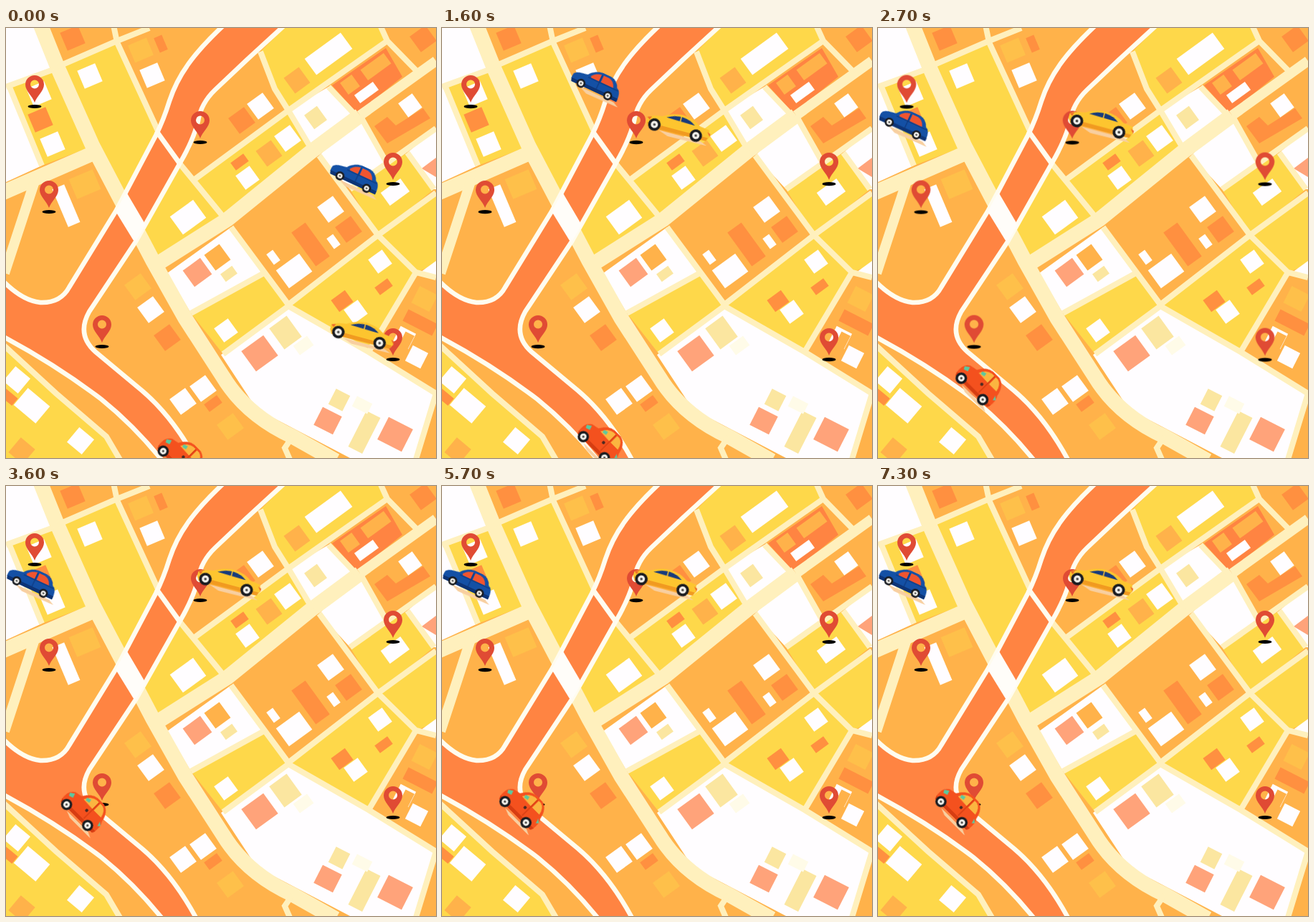
Recreate the animation shown at these times as an HTML page. Size 600 by 600 pixels, loop 7.4 s.

```html
<!DOCTYPE html>
<html lang="en">
<head>
<meta charset="utf-8">
<title>City map with cars</title>
<style>
html, body { margin: 0; width: 100%; height: 100%; overflow: hidden; background: #fff0bd; }
svg { display: block; width: 100vw; height: 100vh; }
.streets { fill: none; stroke: #fff0bd; }
.breathe {
  transform-box: fill-box;
  transform-origin: center;
  animation: breathe 1850ms ease-in-out infinite;
}
@keyframes breathe { 50% { transform: scale(1.02); } }
</style>
</head>
<body>
<svg viewBox="0 0 600 600">
  <defs>
    <g id="pin">
      <path fill="#e04b34" fill-rule="evenodd" d="M0 38C-3 29-13 22-13 13A13 13 0 0 1 13 13C13 22 3 29 0 38ZM-6 12.5A6 6 0 0 0 6 12.5A6 6 0 0 0-6 12.5Z"/>
      <ellipse cy="43.5" rx="9.5" ry="2.6"/>
    </g>
    <g id="wheel">
      <circle r="8.7" fill="#191b20"/>
      <circle r="5" fill="#f4f2ed"/>
      <circle r="1.8" fill="#444"/>
    </g>
  </defs>

  <!-- Districts meet at the street centre lines; the streets are drawn over them. -->
  <rect width="600" height="600" fill="#ffb24a"/>
  <path fill="#fed84a" d="M4 80 66 58 121 165 50 192ZM72 52 155 18 214 148 162 240ZM243 190 302 262 205 327 188 285ZM262 212 394 115 428 172 309 267ZM355 33 388 0H522L532 18 394 115 375 85ZM480 225 560 174 597 225 519 289ZM519 289 600 230V330L572 341ZM258 398 358 343 394 386 303 455ZM394 386 519 289 572 341 506 452ZM0 446 70 510 140 570 160 600H0Z"/>
  <path fill="#fffdff" d="M0 0H46L72 58 4 80 50 192 0 215ZM394 115 450 82 494 122 428 172ZM437 178 494 122 530 186 480 225ZM560 174 600 140V225H597ZM225 342 314 278 358 343 258 398ZM300 456 394 388 600 512 572 600H480L350 532ZM578 341 600 325V348Z"/>
  <path fill="#ff8442" d="M455 80 530 28 553 68 490 119Z"/>
  <path fill="#ff9040" d="M514 137 532 124 544 136 582 112 592 126 532 161Z"/>
  <path fill="#ffa37a" d="M580 196 600 181V208Z"/>
  <g class="streets">
    <path stroke-width="21" d="M48-5 72 55 121 165 205 325 250 405 303 487Q335 540 400 570L460 604M-5 230 128 172M205 333 309 267 425 173 494 122"/>
    <path stroke-width="14" d="M494 122 600 46M42 208-2 342"/>
    <path stroke-width="8" d="M72 54 155 18 200 0M150-4 155 20 214 148M0 82 66 58M4 80 50 192M262 212 394 115 532 18 522-4M355 33 375 85 394 115 428 172M532 18 575 62M450 82 490 124M243 190 302 262M314 278 394 386 519 289 600 230M258 398 358 343M437 178 519 289 572 341 600 348M494 122 530 186M480 225 600 140M560 174 597 225M303 455 394 388 506 452 600 510 572 602M572 341 506 452M400 570 389 586 396 602M-4 442 70 510 140 570 160 604"/>
  </g>
  <g id="houses"></g>

  <path fill="#ff8442" stroke="#fffcef" stroke-width="6.5" d="M305-5C262 35 240 65 228 102Q220 128 209 150L153 256 88 362Q76 384 48 383 22 380-5 352V430Q70 470 133 518 180 556 220 606H267Q232 540 185 502L125 452Q98 428 116 396L181 298 243 188Q262 155 268 130 272 105 292 86 340 40 390-5Z"/>
  <path stroke="#fffcef" stroke-width="7" d="M210 144 243 190"/>
  <path fill="#fffdf9" d="M168 229 195 275 180 300 153 256Z"/>

  <g id="pins"></g>

  <g class="car" data-route="M484.5 215Q330 107 213.5 86 131 71 33.5 141" data-duration="2800" data-tilt="25"><g class="breathe">
    <path fill="#f8cfa0" d="M-20 5H32L40 9-8 10Z"/>
    <path fill="#1450a5" d="M-36-3Q-37-11-28-13L-17-15Q-10-25 2-26H14Q24-25 28-15 35-13 35 2L-34 3Z"/>
    <path fill="#0d3477" d="M-36-2H35V3H-34Z"/>
    <path fill="#f0552f" d="M-12-15Q-7-22 1-23V-13H-11ZM4-23H12Q20-22 23-13H4Z"/>
    <path fill="none" stroke="#0d3477" d="M2-23V-2M-15-12H31"/>
    <use href="#wheel" transform="translate(-20.5) scale(.72)"/>
    <use href="#wheel" transform="translate(20.5) scale(.72)"/>
  </g></g>

  <g class="car" data-route="M492.5 432Q505 232 325.5 142.5L307 137.5" data-duration="1870" data-tilt="15"><g class="breathe">
    <path fill="#f8cfa0" d="M-22 6H38L48 10-8 11Z"/>
    <path fill="#fdc52f" d="M-42-8Q-34-13-22-14-10-22 5-23 22-22 32-14L46-12 49-3 45 4-38 5-42-1Z"/>
    <path fill="#f19a20" d="M-40-1H47L45 4-38 5Z"/>
    <path fill="#173b7c" d="M-16-14Q-6-20 5-20 18-19 25-13Z"/>
    <path fill="none" stroke="#fdc52f" stroke-width="1.5" d="M4-21V-12"/>
    <path fill="#ee6a2a" d="M-42-8-36-10-38-5ZM44-9 49-7V-3Z"/>
    <use href="#wheel" x="-29.8"/>
    <use href="#wheel" x="29.8"/>
  </g></g>

  <g class="car" data-route="M234 605C262 645 268 640 211 584L129 501Q99 470 98 460.5L102.5 455" data-duration="3950" data-tilt="45"><g class="breathe">
    <path fill="#f8cfa0" d="M-14 6H28L36 10-4 10Z"/>
    <path fill="#f4511e" d="M-31-2Q-33-16-24-21L-14-23Q-7-36 4-37H16Q28-34 31-18 36-10 33 2L-29 3Z"/>
    <path fill="#d63d12" d="M-31-2H34L32 3H-29Z"/>
    <path fill="#fbb540" d="M-9-22Q-4-33 5-34H9V-21ZM12-34H16Q24-32 26-21H12Z"/>
    <path fill="none" stroke="#c9370f" d="M10-34V-3"/>
    <path fill="#5cc8a0" d="M-29-15-23-19-21-13-27-11ZM-7-27-1-29 0-24-6-23ZM29-16 34-12 31-9Z"/>
    <circle cx="5" cy="-14" r="2.2" fill="#4b2a22"/>
    <use href="#wheel" transform="translate(-20.7) scale(.9)"/>
    <use href="#wheel" transform="translate(20.7) scale(.9)"/>
  </g></g>
</svg>
<script>
const svgNS = "http://www.w3.org/2000/svg";
const loopMs = 7400;

function add(parentId, tag, attrs) {
  const node = document.createElementNS(svgNS, tag);
  for (const [key, value] of Object.entries(attrs)) node.setAttribute(key, value);
  document.getElementById(parentId).append(node);
  return node;
}

const points = text => text.split(" ").map(pair => pair.split(",").map(Number));

// Houses line up with the streets of their quarter.
function streetAngle(x, y) {
  if (x < 230 && y < 260) return -23;
  if (x < 110) return 40;
  return x + y > 930 ? 27 : -36;
}

function houses(fill, width, height, places) {
  for (const [x, y] of points(places)) {
    add("houses", "rect", {
      x: -width / 2, y: -height / 2, width, height, fill,
      transform: `translate(${x} ${y}) rotate(${streetAngle(x, y)})`
    });
  }
}

const white = "#fffdff", rust = "#ff9040", orange = "#ffb24a";
const amber = "#fec04a", salmon = "#ffa37a", cream = "#fbe6a0";

houses(white, 27, 27, "46,92 117,67 204,66 65,162 355,109 393,154 453,253 202,393 247,521 275,503 15,491 104,576");
houses(white, 24, 24, "337,209 307,422 522,326 488,396 573,459 564,108 556,432");
houses(white, 40, 31, "254,264 402,339 36,527");
houses(white, 62, 28, "450,36");
houses(white, 34, 22, "543,229");
houses(white, 18, 57, "84,248");
houses(white, 11, 18, "373,320 457,298");
houses(rust, 27, 27, "93,14 48,128 329,129 478,281 225,432 582,15");
houses(rust, 22, 13, "326,187 289,524 527,361 4,515");
houses(rust, 24, 58, "425,302");
houses(rust, 12, 22, "216,22");
houses(rust, 24, 20, "469,381");
houses(rust, 46, 18, "578,411");
houses(orange, 26, 27, "406,73 367,175 295,320 22,590");
houses(orange, 20, 20, "480,79");
houses(orange, 40, 18, "516,54");
houses(orange, 14, 30, "557,440");
houses(amber, 28, 26, "188,31 184,361 313,556 584,378");
houses(amber, 36, 30, "110,218");
houses(salmon, 30, 28, "267,341 449,548");
houses(salmon, 38, 35, "354,454 543,567");
houses(cream, 22, 24, "432,125 465,519");
houses(cream, 20, 13, "311,343");
houses(cream, 30, 36, "390,425");
houses(cream, 22, 56, "500,564");
houses("#fffbe8", 24, 16, "415,443 497,526");
houses(white, 32, 14, "503,90");

for (const [x, y] of points("40,66 271,116 60,213 540,174 134,401 540,419")) {
  const place = add("pins", "g", { transform: `translate(${x} ${y})` });
  place.innerHTML = '<use href="#pin" class="breathe"/>';
}

const cars = [...document.querySelectorAll(".car")].map(node => {
  const route = document.createElementNS(svgNS, "path");
  route.setAttribute("d", node.dataset.route);
  return { node, route, length: route.getTotalLength(), duration: +node.dataset.duration, tilt: node.dataset.tilt };
});

const easeInOut = u => (1 - Math.cos(Math.PI * u)) / 2;

function draw() {
  const time = performance.now() % loopMs;
  for (const { node, route, length, duration, tilt } of cars) {
    const { x, y } = route.getPointAtLength(length * easeInOut(Math.min(1, time / duration)));
    node.setAttribute("transform", `translate(${x} ${y}) rotate(${tilt})`);
  }
  requestAnimationFrame(draw);
}
draw();
</script>
</body>
</html>
```
